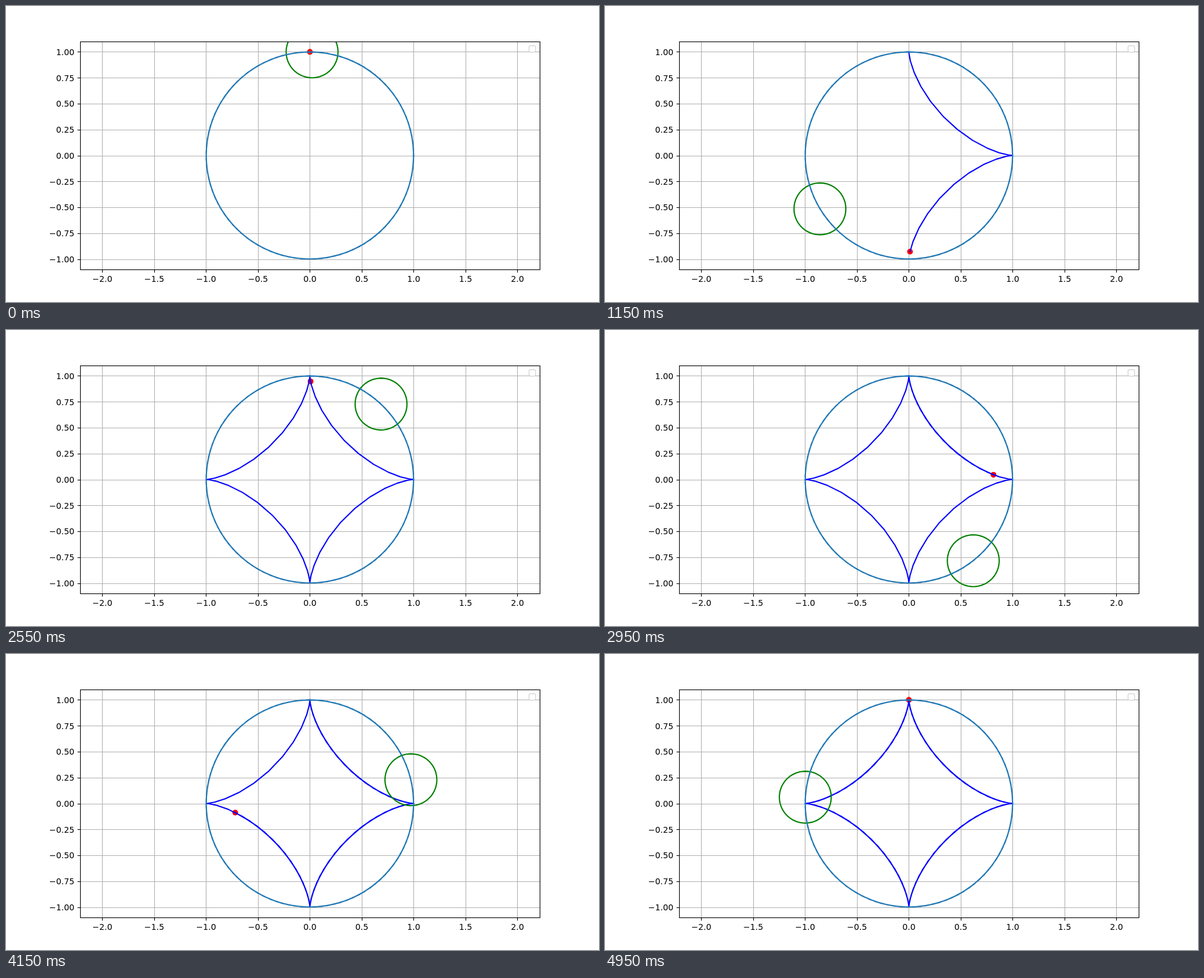
Animation, 1000 px wide and 500 px high, one loop 5000 ms. Source, as an HTML page with a canvas:

```html
<!DOCTYPE html>
<html lang="en">
<head>
<meta charset="utf-8">
<title>Rolling circle</title>
<style>
html, body { margin: 0; width: 100%; height: 100%; overflow: hidden; background: #fff; }
canvas { display: block; }
</style>
</head>
<body>
<canvas id="plot" width="1000" height="500"></canvas>
<script>
const ctx = document.getElementById('plot').getContext('2d');
const PT = 100 / 72;
const BOX = { l: 125, t: 60, r: 900, b: 445 };
const CX = 512.456, CY = 252.5, UNIT = 175.02;
const STEPS = 100, STEP_MS = 50;
const TURN = 4 * Math.PI / (STEPS - 1);
const PHASE = 0.021;

const px = x => CX + x * UNIT;
const py = y => CY - y * UNIT;
const snap = v => Math.floor(v + 0.5) + 0.5;
const label = (v, digits) => v.toFixed(digits).replace('-', '\u2212');

const xTicks = Array.from({ length: 9 }, (_, i) => -2 + i * 0.5);
const yTicks = Array.from({ length: 9 }, (_, i) => -1 + i * 0.25);

function segment(x1, y1, x2, y2) {
  ctx.beginPath();
  ctx.moveTo(x1, y1);
  ctx.lineTo(x2, y2);
  ctx.stroke();
}

// Polyline through point(angle) for the first n sample angles
function curve(color, n, point) {
  ctx.strokeStyle = color;
  ctx.lineWidth = 1.5 * PT;
  ctx.lineJoin = 'round';
  ctx.lineCap = 'square';
  ctx.beginPath();
  for (let i = 0; i < n; i++) {
    const [x, y] = point(i * TURN);
    ctx.lineTo(px(x), py(y));
  }
  ctx.stroke();
}

const ring = (x, y, r) => a => [x + r * Math.cos(a), y + r * Math.sin(a)];
const astroid = a => [Math.sin(a) ** 3, Math.cos(a) ** 3];

function drawGrid() {
  ctx.lineCap = 'butt';
  ctx.lineWidth = 0.8 * PT;
  ctx.strokeStyle = '#b0b0b0';
  for (const v of xTicks) segment(snap(px(v)), BOX.t, snap(px(v)), BOX.b);
  for (const v of yTicks) segment(BOX.l, snap(py(v)), BOX.r, snap(py(v)));
}

function drawAxes() {
  ctx.lineCap = 'butt';
  ctx.lineWidth = 0.8 * PT;
  ctx.strokeStyle = ctx.fillStyle = '#000';
  ctx.font = `${10 * PT}px "DejaVu Sans", sans-serif`;
  ctx.textBaseline = 'alphabetic';
  ctx.textAlign = 'center';
  for (const v of xTicks) {
    const x = snap(px(v));
    segment(x, BOX.b + 0.5, x, BOX.b + 5.4);
    ctx.fillText(label(v, 1), px(v), 466);
  }
  ctx.textAlign = 'right';
  for (const v of yTicks) {
    const y = snap(py(v));
    segment(BOX.l + 0.5, y, BOX.l - 4.4, y);
    ctx.fillText(label(v, 2), 115.3, Math.round(py(v) + 5.3));
  }
  ctx.strokeRect(BOX.l + 0.5, BOX.t + 0.5, BOX.r - BOX.l, BOX.b - BOX.t);
}

function drawLegend() {
  ctx.beginPath();
  ctx.roundRect(882, 67, 11.1, 11.1, 2.8);
  ctx.fillStyle = 'rgba(255,255,255,0.8)';
  ctx.fill();
  ctx.strokeStyle = 'rgba(204,204,204,0.8)';
  ctx.lineWidth = PT;
  ctx.stroke();
}

function drawCurves(k) {
  const [dx, dy] = astroid(k * TURN);
  const roll = k + PHASE;
  ctx.save();
  ctx.beginPath();
  ctx.rect(BOX.l, BOX.t, BOX.r - BOX.l, BOX.b - BOX.t);
  ctx.clip();
  ctx.fillStyle = '#f00';
  ctx.beginPath();
  ctx.arc(px(dx), py(dy), 3.5 * PT, 0, 2 * Math.PI);
  ctx.fill();
  if (k > 0) curve('#00f', k + 1, astroid);
  curve('#008000', STEPS, ring(Math.sin(roll), Math.cos(roll), 0.25));
  curve('#1f77b4', STEPS, ring(0, 0, 1));
  ctx.restore();
}

function frame() {
  const k = Math.floor(performance.now() / STEP_MS) % STEPS;
  ctx.fillStyle = '#fff';
  ctx.fillRect(0, 0, 1000, 500);
  drawGrid();
  drawCurves(k);
  drawAxes();
  drawLegend();
  requestAnimationFrame(frame);
}
frame();
</script>
</body>
</html>
```
